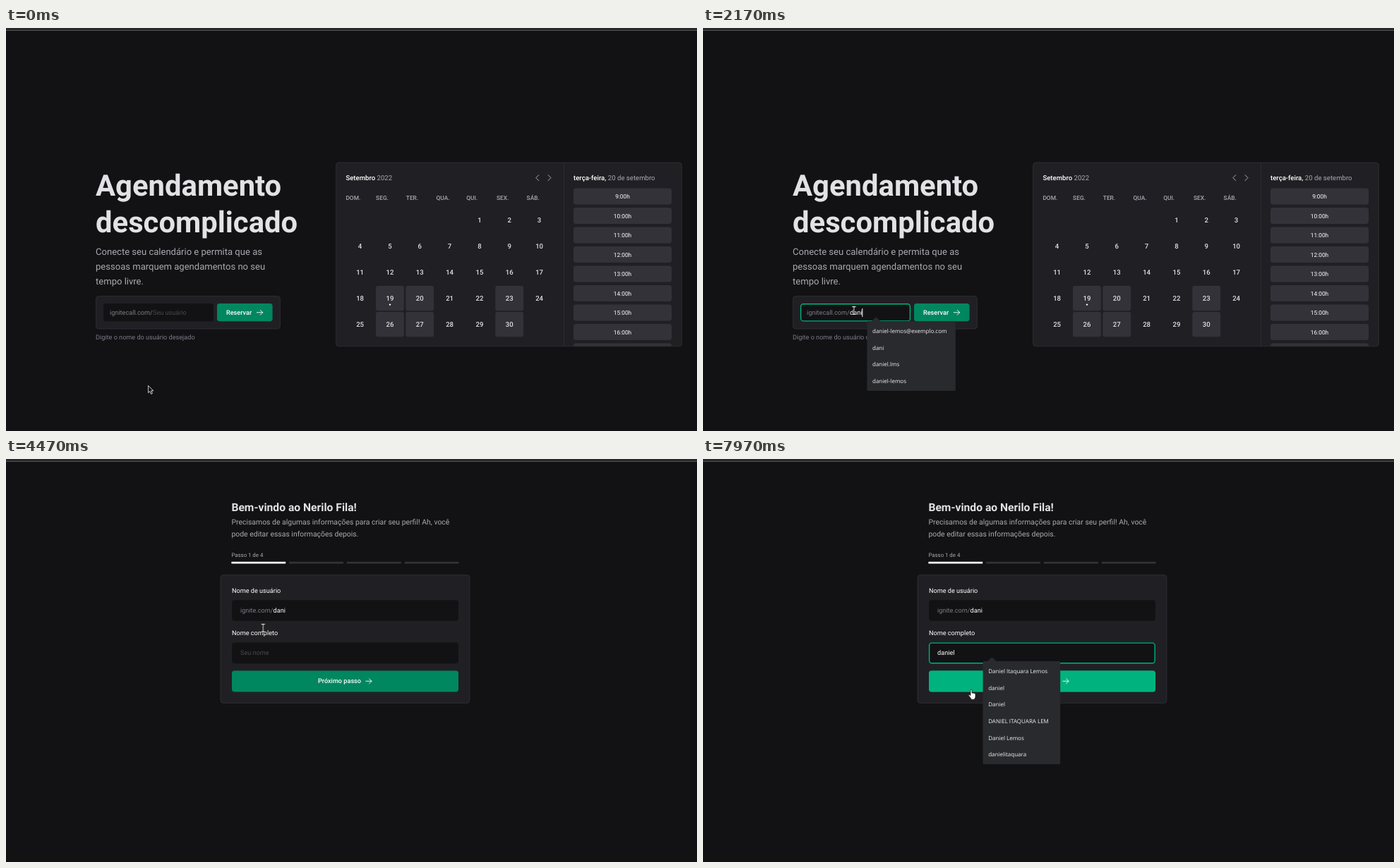
An HTML page for the animation above (8000 ms loop, 979x572 px).

```html
<!DOCTYPE html>
<html lang="pt-BR">
<head>
<meta charset="utf-8">
<title>Agendamento</title>
<style>
  html, body { margin: 0; width: 100%; height: 100%; overflow: hidden; background: #121214; }
  svg { display: block; width: 979px; height: 572px; font: 9.14px Roboto, sans-serif; text-rendering: geometricPrecision; white-space: pre; }
  text { fill: #fff; }
  .title { font-size: 41.77px; font-weight: 700; fill: #e1e1e6; }
  .lead { font-size: 13.05px; fill: #a9a9b2; }
  .welcome { font-size: 15.66px; font-weight: 700; fill: #e1e1e6; }
  .intro { font-size: 10.44px; fill: #a9a9b2; }
  .step { font-size: 7.83px; fill: #a9a9b2; }
  .medium { font-weight: 500; }
  .muted { fill: #7c7c8a; }
  .hint { fill: #48484f; }
  .head { font-size: 9.6px; }
  .head tspan, .week { fill: #a9a9b2; }
  .head tspan { font-weight: 400; }
  .week { font-size: 8.4px; font-weight: 500; }
  .day { font-size: 9.6px; font-weight: 500; fill: #e1e1e6; text-anchor: middle; }
  .slot { font-size: 8.35px; text-anchor: middle; }
  .panel { fill: #202024; stroke: #323238; stroke-width: .8; }
  .field { fill: #121214; }
  .cell { fill: #323238; }
  .button { fill: #00875f; }
  .hover { fill: #00b37e; }
  .focus { fill: none; stroke: #00b37e; stroke-width: 1.4; }
  .line { fill: none; stroke: #fff; stroke-width: .9; stroke-linecap: round; stroke-linejoin: round; }
  .chevron { fill: none; stroke: #a9a9b2; stroke-width: 1; stroke-linecap: round; stroke-linejoin: round; }
  .menu { fill: #292a2d; }
  .item { font: 8px "Open Sans", "Noto Sans", sans-serif; fill: #f1f1f3; }
  .caret { fill: #fff; }
</style>
</head>
<body>
<svg viewBox="0 0 979 572">
  <defs>
    <clipPath id="calendarClip"><rect x="468" y="191" width="489.5" height="260.6" rx="4"/></clipPath>
  </defs>
  <rect width="979" height="572" fill="#121214"/>
  <rect width="979" height="3" fill="#29292b"/>
  <rect y="3" width="979" height="1" fill="#505052"/>

  <g id="home">
    <text class="title" x="127" y="238">Agendamento</text>
    <text class="title" x="127" y="290.2">descomplicado</text>
    <text class="lead" x="127" y="321.8">Conecte seu calendário e permita que as</text>
    <text class="lead" x="127" y="342.7">pessoas marquem agendamentos no seu</text>
    <text class="lead" x="127" y="363.6">tempo livre.</text>
    <rect class="panel" x="127.4" y="380.6" width="261" height="46.4" rx="4"/>
    <rect class="field" x="138" y="391" width="156" height="25.4" rx="4"/>
    <rect class="focus" id="focus1" x="138.6" y="391.7" width="154.8" height="24.2" rx="3.5"/>
    <text class="muted" x="147" y="407">ignitecall.com/</text>
    <text class="hint" id="hint1" x="208" y="407">Seu usuário</text>
    <text id="typed1" x="208" y="407"></text>
    <g id="spot1"><rect class="caret" id="caret1" x="208" y="398" width="1" height="12"/></g>
    <rect class="button" x="299" y="391" width="78.6" height="25.2" rx="3.6"/>
    <text class="medium" x="312" y="407">Reservar</text>
    <path class="line" d="M355.3 403.8h8.4m-3.4-3.4 3.4 3.4-3.4 3.4"/>
    <text class="muted" x="127" y="442.3">Digite o nome do usuário desejado</text>

    <rect class="panel" x="467.6" y="191" width="489.8" height="260.8" rx="4"/>
    <path d="M790.4 191.4v260" stroke="#323238" stroke-width=".8"/>
    <text class="head medium" x="481.4" y="215.6">Setembro <tspan>2022</tspan></text>
    <path class="chevron" d="m754.8 208.6-4 4 4 4m13.2-8 4 4-4 4"/>
    <text class="head medium" x="804" y="215.6">terça-feira, <tspan>20 de setembro</tspan></text>
    <g id="calendar"></g>
    <circle cx="544" cy="392.6" r="1.2" fill="#fff"/>
    <g id="slots" clip-path="url(#calendarClip)"></g>
  </g>

  <g id="signup">
    <text class="welcome" x="319.4" y="74">Bem-vindo ao Nerilo Fila!</text>
    <text class="intro" x="319.4" y="93">Precisamos de algumas informações para criar seu perfil! Ah, você</text>
    <text class="intro" x="319.4" y="109.8">pode editar essas informações depois.</text>
    <text class="step" x="319.4" y="139.4">Passo 1 de 4</text>
    <g id="steps"></g>
    <rect class="panel" x="304" y="164.6" width="353" height="182" rx="4"/>
    <text x="320" y="190.4">Nome de usuário</text>
    <rect class="field" x="320" y="200.2" width="321" height="29.6" rx="4"/>
    <text class="muted" x="332" y="218.2">ignite.com/<tspan fill="#fff">dani</tspan></text>
    <text x="320" y="250">Nome completo</text>
    <rect class="field" x="320" y="260.4" width="321" height="29.8" rx="4"/>
    <rect class="focus" id="focus2" x="320.6" y="261.1" width="319.6" height="28.6" rx="3.5"/>
    <text class="hint" id="hint2" x="332" y="278.2">Seu nome</text>
    <text id="typed2" x="332" y="278.2"></text>
    <g id="spot2"><rect class="caret" id="caret2" x="332" y="269" width="1" height="12"/></g>
    <rect class="button" x="320" y="300.4" width="321" height="30" rx="3.6"/>
    <rect class="hover" id="hover" x="320" y="300.4" width="321" height="30" rx="3.6"/>
    <text class="medium" x="442" y="318.2">Próximo passo</text>
    <path class="line" d="M509.8 315.3h8.2m-3.4-3.4 3.4 3.4-3.4 3.4"/>
  </g>

  <g id="menus"></g>

  <g id="pointer">
    <circle id="click" r="8" fill="#b0a40c" fill-opacity=".88"/>
    <path id="arrow" d="M.4.5v10.3l2.4-2.2 1.7 3.9 1.9-.8-1.7-3.8h3.2z" fill="#121214" stroke="#fff" stroke-width=".8" stroke-linejoin="round"/>
    <g id="beam" fill="none">
      <path d="M-2.6-5.4H2.6M0-5.4V5.4M-2.6 5.4H2.6" stroke="#000" stroke-width="2.4"/>
      <path d="M-2.6-5.4H2.6M0-5.4V5.4M-2.6 5.4H2.6" stroke="#e8e8e8" stroke-width="1.1"/>
    </g>
    <path id="hand" d="M-1 .6q1-1 2 0v4.6q1-.8 1.8.2 1-.6 1.7.4 1.4-.4 1.5.9v3.5q0 1.6-1 2.6v1.4h-5.4v-1.2l-3.2-4.3q-.3-1.5 1.2-1.2l1.4 1.2z" fill="#fff" stroke="#111" stroke-width=".7" stroke-linejoin="round"/>
  </g>
</svg>
<script>
  const $ = id => document.getElementById(id);
  const LOOP = 8000;
  const rules = [];

  const text = (cls, x, y, s) => `<text class="${cls}" x="${x}" y="${y}">${s}</text>`;
  const box = (cls, x, y, w, h, r) => `<rect class="${cls}" x="${x}" y="${y}" width="${w}" height="${h}" rx="${r}"/>`;

  // Stops are [ms, value] pairs
  function play(id, prop, stops, ease = 'step-end') {
    const keys = stops.map(([ms, v]) => `${ms / LOOP * 100}%{${prop}:${v}}`).join('');
    rules.push(`@keyframes ${id}-k{${keys}} #${id}{animation:${id}-k ${LOOP}ms ${ease} infinite}`);
  }

  // Times switch the element on and off in turn
  function show(id, ...times) {
    play(id, 'opacity', [[0, 0], ...times.map((ms, i) => [ms, 1 - i % 2])]);
  }

  function type(n, word, times, advances) {
    $('typed' + n).innerHTML = [...word].map((c, i) => `<tspan id="t${n}${i}">${c}</tspan>`).join('');
    let x = 0;
    const spots = [[0, 'translateX(0)']];
    times.forEach((ms, i) => {
      play(`t${n}${i}`, 'fill-opacity', [[0, 0], [ms, 1]]);
      x += advances[i];
      spots.push([ms, `translateX(${x}px)`]);
    });
    play('spot' + n, 'transform', spots);
  }

  function menu(id, x, y, w, items) {
    const rows = items.map((s, i) => text('item', x + 7.6, y + 17.2 + i * 23.6, s)).join('');
    $('menus').innerHTML += `<g id="${id}">${box('menu', x, y, w, items.length * 23.6 + 4.6, 1.5)}
      <path class="menu" d="M${x + 6.4} ${y + .2}l6.4-6 6.4 6z"/>${rows}</g>`;
  }

  // Calendar
  const column = i => 501.6 + i * 42.33;
  const open = [19, 20, 23, 26, 27, 30];
  let days = ['DOM.', 'SEG.', 'TER.', 'QUA.', 'QUI.', 'SEX.', 'SÁB.']
    .map((s, i) => text('week', 481.4 + i * 42.7, 244.2, s)).join('');
  for (let d = 1; d <= 30; d++) {
    const cell = d + 3, x = column(cell % 7), y = 272 + 37 * Math.floor(cell / 7);
    if (open.includes(d)) days += box('cell', x - 19.9, y - 17, 39.8, 35.2, 3);
    days += text('day', x, y + 3.5, d);
  }
  $('calendar').innerHTML = days;

  let slots = '';
  for (let i = 0; i < 9; i++) {
    const y = 227.4 + i * 27.5;
    slots += box('cell', 804, y, 139, 23, 3.4) + text('slot', 873.5, y + 14.6, `${9 + i}:00h`);
  }
  $('slots').innerHTML = slots;

  $('steps').innerHTML = [0, 1, 2, 3]
    .map(i => `<rect x="${319.4 + i * 81.8}" y="145.8" width="76.8" height="2.7" fill="${i ? '#323238' : '#fff'}"/>`).join('');

  // Suggestions
  const users = ['daniel-lemos@exemplo.com', 'dani', 'daniel.lms', 'daniel-lemos'];
  const people = ['Daniel Itaquara Lemos', 'daniel', 'Daniel', 'DANIEL ITAQUARA LEM', 'Daniel Lemos', 'danielitaquara'];
  menu('allUsers', 232.4, 416, 125.4, ['qwe', ...users.slice(0, 3), 'pixnave_d', users[3]]);
  menu('someUsers', 232.4, 416, 125.4, users);
  menu('allPeople', 396.6, 287, 135, people);
  menu('somePeople', 396.6, 287, 109.6, people);

  // Scenes
  show('home', 0, 3930);
  show('signup', 3930);
  show('focus1', 970);
  show('focus2', 5360);
  show('hint1', 0, 1900);
  show('hint2', 0, 5830);
  show('allUsers', 1040, 1900);
  show('someUsers', 1900, 4000);
  show('allPeople', 5430, 5830);
  show('somePeople', 5830);
  show('hover', 7900);

  // Typing
  type(1, 'dani', [1900, 1970, 2100, 2170], [5.1, 5, 5, 2.2]);
  type(2, 'daniel', [5830, 5960, 6030, 6230, 6300, 7090], [5.1, 5, 5, 2.2, 4.9, 2.2]);
  show('caret1', 970, 1500, 1900, 2700, 3200, 3800);
  show('caret2', 5360, 6830, 7090, 7620);

  // Pointer
  show('click', 970, 1040, 5360, 5500);
  show('arrow', 0, 480, 3930, 4400);
  show('beam', 480, 3930, 4400, 7840);
  show('hand', 7840);
  const path = [
    [0, 201, 507], [69.9, 201, 507], [70, 133, 402], [170, 133, 402],
    [230, 146, 412], [300, 168, 421], [370, 198, 423], [430, 226, 416],
    [500, 236, 405], [560, 228, 396], [620, 214, 401], [4000, 213.6, 401],
    [4140, 240, 376], [4340, 325, 285], [4540, 385, 216], [4680, 380, 228],
    [4820, 358, 250], [4960, 345, 264], [5100, 360.6, 269], [7700, 360.6, 269],
    [7770, 363, 276], [7840, 368, 298], [7900, 374, 314], [7970, 380, 327], [8000, 380, 327]
  ];
  play('pointer', 'transform', path.map(([ms, x, y]) => [ms, `translate(${x}px,${y}px)`]), 'linear');

  const sheet = document.createElement('style');
  sheet.textContent = rules.join('\n');
  document.head.append(sheet);
</script>
</body>
</html>
```
